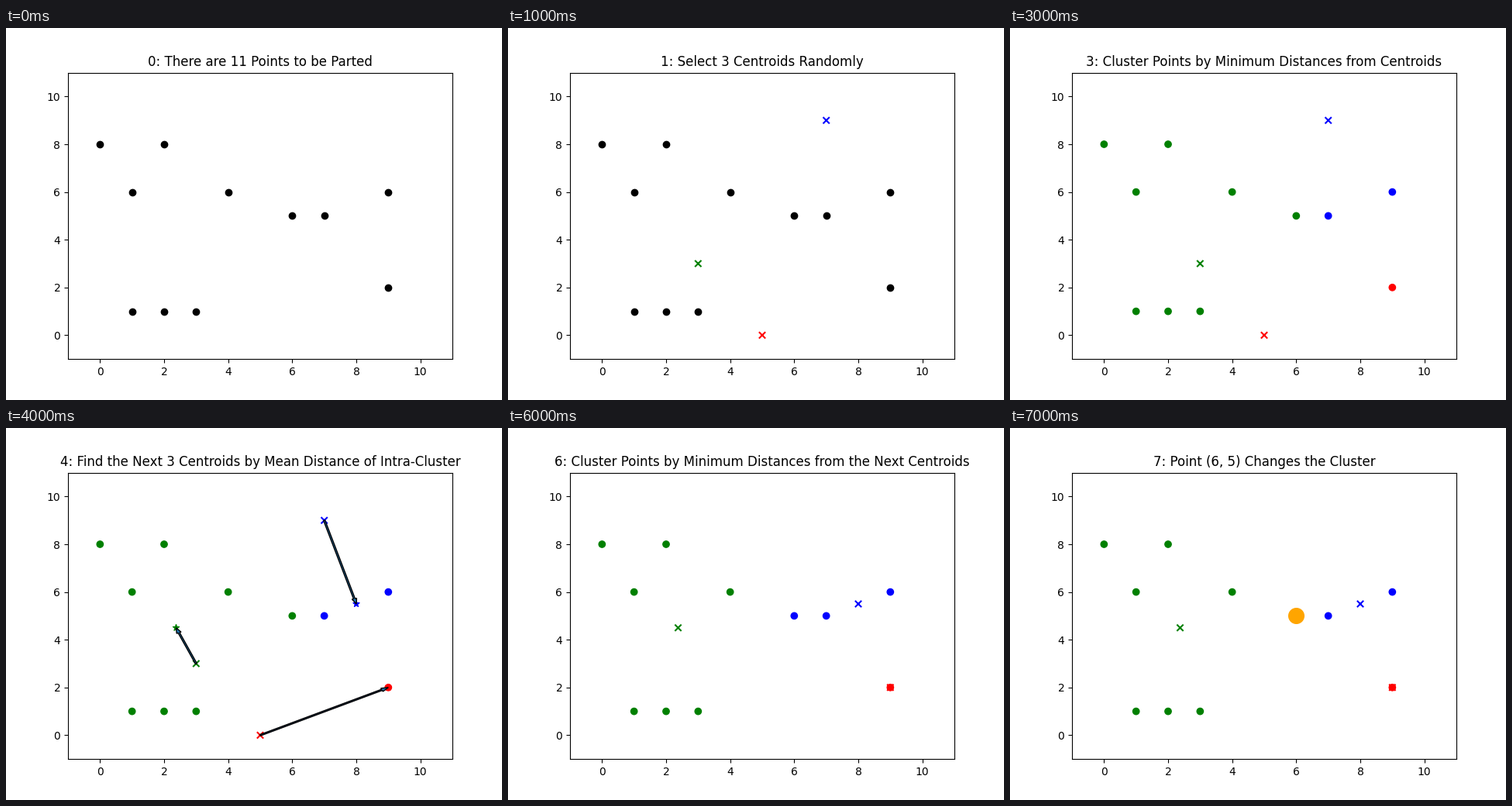
Animation, 640 px wide and 480 px high, one loop 8 s. Source, as a matplotlib script:

```python
import numpy as np
import matplotlib.pyplot as plt
from matplotlib.animation import FuncAnimation

COLORS = np.array(["red", "green", "blue"])
POINTS = np.array([(0, 8), (2, 8), (1, 6), (4, 6), (6, 5), (7, 5),
                   (9, 6), (9, 2), (1, 1), (2, 1), (3, 1)], dtype=float)
FIRST = np.array([(5, 0), (3, 3), (7, 9)], dtype=float)

TITLES = [
    "There are 11 Points to be Parted",
    "Select 3 Centroids Randomly",
    "Calculate Distances between All Points and Centroids",
    "Cluster Points by Minimum Distances from Centroids",
    "Find the Next 3 Centroids by Mean Distance of Intra-Cluster",
    "Recalculate Distances between All Points and the Next Centroids",
    "Cluster Points by Minimum Distances from the Next Centroids",
    "Point (6, 5) Changes the Cluster",
]


def assign(centroids):
    gaps = POINTS[:, None] - centroids[None]
    return np.hypot(gaps[..., 0], gaps[..., 1]).argmin(axis=1)


OLD = assign(FIRST)
SECOND = np.array([POINTS[OLD == k].mean(axis=0) for k in range(3)])
NEW = assign(SECOND)

fig, ax = plt.subplots(figsize=(6.4, 4.8), dpi=100)


def draw_points(labels=None):
    color = "black" if labels is None else COLORS[labels]
    ax.scatter(*POINTS.T, c=color)


def draw_centroids(centroids, marker="x"):
    ax.scatter(*centroids.T, c=COLORS, marker=marker)


def draw_distances(centroids):
    for point in POINTS:
        for center, color in zip(centroids, COLORS):
            ax.plot(*zip(center, point), "-.", color=color, alpha=0.5)


def draw_moves():
    for start, end in zip(FIRST, SECOND):
        ax.arrow(*start, *(end - start), width=0.05,
                 length_includes_head=True)


def draw(step):
    ax.clear()
    ax.set_xlim(-1, 11)
    ax.set_ylim(-1, 11)
    ax.set_title(f"{step}: {TITLES[step]}")

    labels = {3: OLD, 4: OLD, 6: NEW, 7: NEW}.get(step)
    centroids = FIRST if step < 5 else SECOND
    draw_points(labels)
    if step > 0:
        draw_centroids(centroids)
    if step in (2, 5):
        draw_distances(centroids)
    if step == 4:
        draw_centroids(SECOND, "*")
        draw_moves()
    if step == 7:
        ax.scatter(*POINTS[OLD != NEW].T, s=200, c="orange")
    return []


anim = FuncAnimation(fig, draw, frames=len(TITLES), interval=1000,
                     init_func=lambda: [], repeat=True, repeat_delay=0)
plt.show()
```
